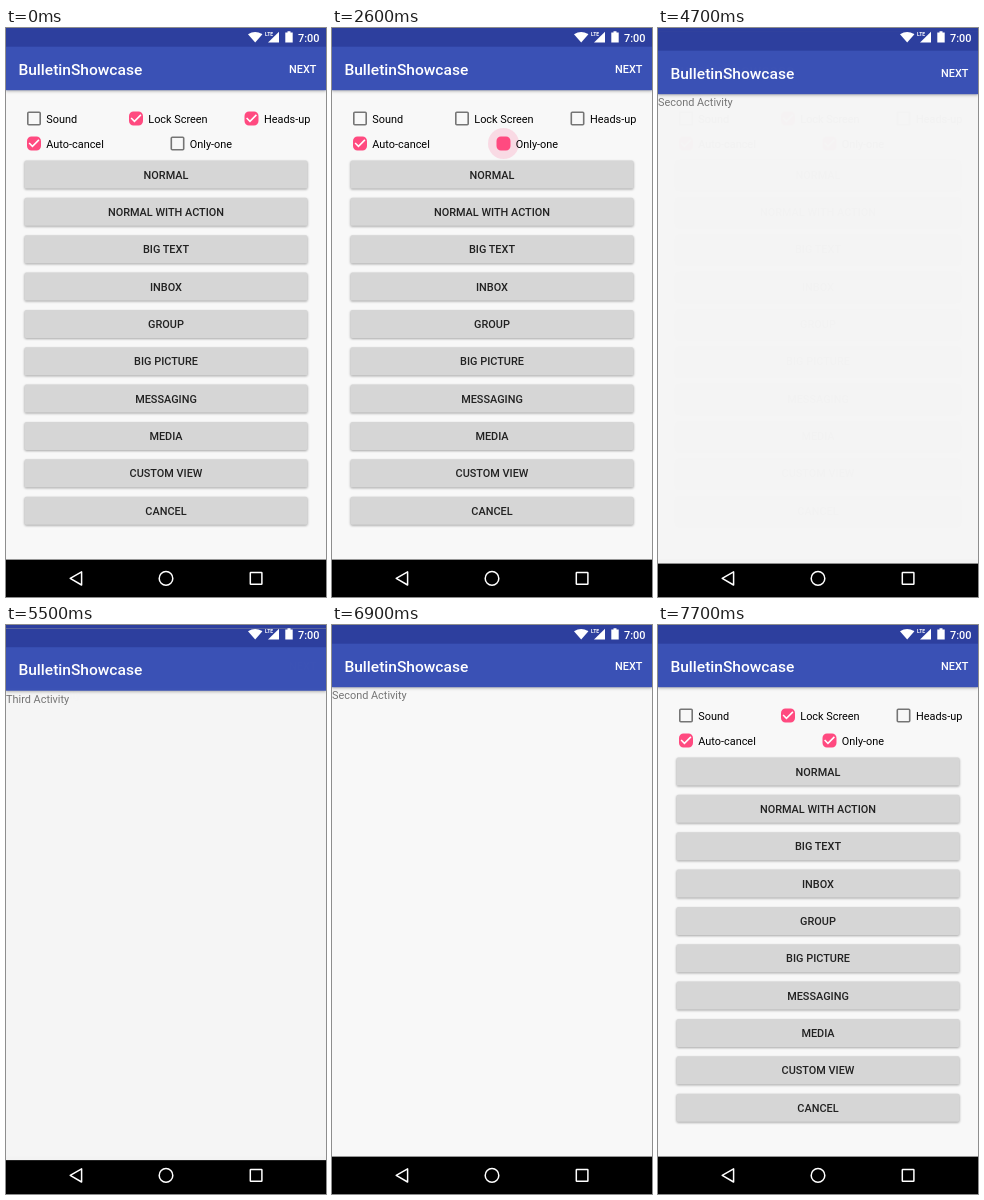
Write an HTML page that moves like this. It is 320 px wide and 569 px high and loops after 7.8 s.

```html
<!DOCTYPE html>
<html lang="en">
<head>
<meta charset="utf-8">
<title>Notification settings</title>
<style>
  html, body { margin: 0; width: 100%; height: 100%; overflow: hidden; background: #000; }
  svg { display: block; width: 100vw; height: 100vh; }
  text { font: 10.9px Roboto, sans-serif; }
  .medium { font-weight: 500; }
  .title { font-size: 15.56px; font-weight: 500; }
  .raised { filter: drop-shadow(0 1px 1px rgba(0,0,0,.33)); }
  .bar { filter: drop-shadow(0 1.5px 1.5px rgba(0,0,0,.3)); }
</style>
</head>
<body>
<svg id="stage" viewBox="0 0 320 569"></svg>
<script>
const LOOP = 7800, STEP = 100, SLIDE = 569 * 0.08;
const PINK = '#ff4a80', GRAY = '#757575';
const stage = document.getElementById('stage');
const clamp = v => Math.max(0, Math.min(1, v));

const text = (x, y, s, attrs = '') => `<text x="${x}" y="${y}" ${attrs}>${s}</text>`;

// label, checkbox centre, label x, initially checked, toggle time, ripple radius
const checks = [
  ['Sound', 28, 90.5, 40.3, 0],
  ['Lock Screen', 130, 90.5, 142.3, 1, 1200, 14],
  ['Heads-up', 245.5, 90.5, 258, 1, 1950, 0],
  ['Auto-cancel', 28, 115.5, 40.3, 1],
  ['Only-one', 171.5, 115.5, 183.8, 0, 2500, 15.5]
];
const RECHECK = 3300; // Lock Screen is switched on again

const buttons = ['NORMAL', 'NORMAL WITH ACTION', 'BIG TEXT', 'INBOX', 'GROUP',
  'BIG PICTURE', 'MESSAGING', 'MEDIA', 'CUSTOM VIEW', 'CANCEL'];

function shell(id, body, next) {
  return `<g id="${id}">
    <rect width="320" height="569"/>
    <rect class="bg" width="320" height="531.6" fill="#f8f8f8"/>
    <rect class="bar" y="10" width="320" height="52.2" fill="#3a51b5"/>
    <rect width="320" height="18.7" fill="#2d3f9e"/>
    ${next ? '<circle class="ripple" cx="297" cy="41" fill="#fff"/>' : ''}
    ${text(12.4, 46.6, 'BulletinShowcase', 'class="title" fill="#fff"')}
    ${next ? text(283, 44.8, 'NEXT', 'class="medium" fill="#fff"') : ''}
    ${body}</g>`;
}

const checkRow = ([label, x, y, labelX]) => `
  <g class="check" transform="translate(${x} ${y})">
    <circle/><rect fill="none" rx="1"/>
    <path d="M-4.9-.55L-1.55 2.8L4.9-3.65" fill="none" stroke="#fff" stroke-width="1.55" pathLength="1"/>
  </g>${text(labelX, y + 4, label)}`;

const button = (label, i) => {
  const y = 132.5 + i * 37.35;
  return `<rect class="raised" x="18.5" y="${y}" width="283" height="28" rx="1.6" fill="#d6d6d6"/>` +
    text(160, y + 18, label, 'class="medium" text-anchor="middle" fill="#212121"');
};

const note = s => text(0, 74, s, `fill="${GRAY}"`);

stage.innerHTML =
  shell('main', checks.map(checkRow).join('') + buttons.map(button).join(''), true) +
  shell('second', note('Second Activity'), true) +
  shell('third', note('Third Activity'), false) +
  `<rect id="press" y="532" height="37" rx="18.5" fill="#fff"/>
  <g fill="none" stroke="#fff" stroke-width="1.5" stroke-linejoin="round">
    <path d="M64.2 550.4L75.6 543.8V557Z"/>
    <circle cx="160" cy="550.4" r="6.8"/>
    <rect x="244.3" y="544.6" width="11.6" height="11.6" rx=".5"/>
  </g>
  <g fill="#fff">
    <path d="M249.2 14.6L242 6.2Q249.2 1.9 256.4 6.2Z"/>
    <path d="M262 14.4L273 3.8V14.4Z"/>
    <path d="M279.3 4.6H281.5V3.3H284.5V4.6H286.7V14.6H279.3Z"/>
    ${text(259, 8.2, 'LTE', 'style="font-size:5px;font-weight:700"')}
    ${text(292, 13.5, '7:00', 'class="medium"')}
  </g>`;

const boxes = [...stage.querySelectorAll('.check')];
const nextRipples = [...stage.querySelectorAll('.ripple')];
const set = (el, attrs) => { for (const k in attrs) el.setAttribute(k, attrs[k]); };

function drawCheck(el, [, , , , initial, tap, radius], t) {
  let on = initial, v = initial, age = -1;
  if (tap && t >= tap) {
    age = t - tap;
    on = 1 - initial;
    if (initial && radius && t >= RECHECK) {
      age = t - RECHECK;
      on = 1;
    }
    const p = clamp(age / 250);
    v = on ? p : 1 - p;
  }
  const fill = clamp(v / 0.4), tick = clamp((v - 0.4) / 0.6);
  const w = 1.6 + 5.4 * fill, [ring, box, mark] = el.children;
  set(box, { x: w / 2 - 7, y: w / 2 - 7, width: 14 - w, height: 14 - w,
    'stroke-width': w, stroke: fill ? PINK : GRAY });
  set(mark, { 'stroke-dasharray': `${tick} 2`, opacity: tick ? 1 : 0 });
  const live = age >= 0 && age < 500 && radius;
  set(ring, { r: live ? radius * clamp(0.5 + age / 200) : 0, fill: on ? PINK : '#000',
    opacity: (on ? 0.17 : 0.1) * clamp((500 - age) / 400) });
}

// Each move is given by its first visible time and the progress made by then, in ms.
function slide(id, t, [openAt, openLead], [closeAt, closeLead]) {
  const el = document.getElementById(id);
  let y = 0, alpha = 0, bg = '#f8f8f8';
  if (t >= closeAt) {
    const e = t - closeAt + closeLead;
    y = SLIDE * clamp(e / 250) ** 4;
    alpha = 1 - clamp((e - 100) / 150);
  } else if (t >= openAt) {
    const e = t - openAt + openLead;
    y = SLIDE * (1 - clamp(e / 350)) ** 5;
    alpha = 1 - (1 - clamp(e / 200)) ** 4;
    if (y > 0.05) bg = '#f5f5f5';
  }
  set(el, { transform: `translate(0 ${y})`, opacity: alpha });
  set(el.querySelector('.bg'), { fill: bg });
}

function draw(t) {
  boxes.forEach((el, i) => drawCheck(el, checks[i], t));
  nextRipples.forEach((el, i) => {
    const age = t - [4300, 5200][i], live = age >= 0 && age < 500;
    set(el, { r: live ? 25 * clamp(0.4 + age / 300) : 0, opacity: 0.2 * clamp((500 - age) / 300) });
  });
  slide('second', t, [4700, 135], [7200, 50]);
  slide('third', t, [5400, 40], [6300, 50]);

  const age = t - (t >= 7100 ? 7100 : 6200), live = age >= 0 && age < 600;
  const w = live ? 64 * clamp(0.5 + age / 300) : 0;
  set(document.getElementById('press'), { x: 70 - w / 2, width: w, opacity: 0.2 * clamp((600 - age) / 450) });
}

const start = performance.now();
function tick() {
  const t = (performance.now() - start) % LOOP;
  draw(Math.floor(t / STEP) * STEP);
  requestAnimationFrame(tick);
}
tick();
</script>
</body>
</html>
```
